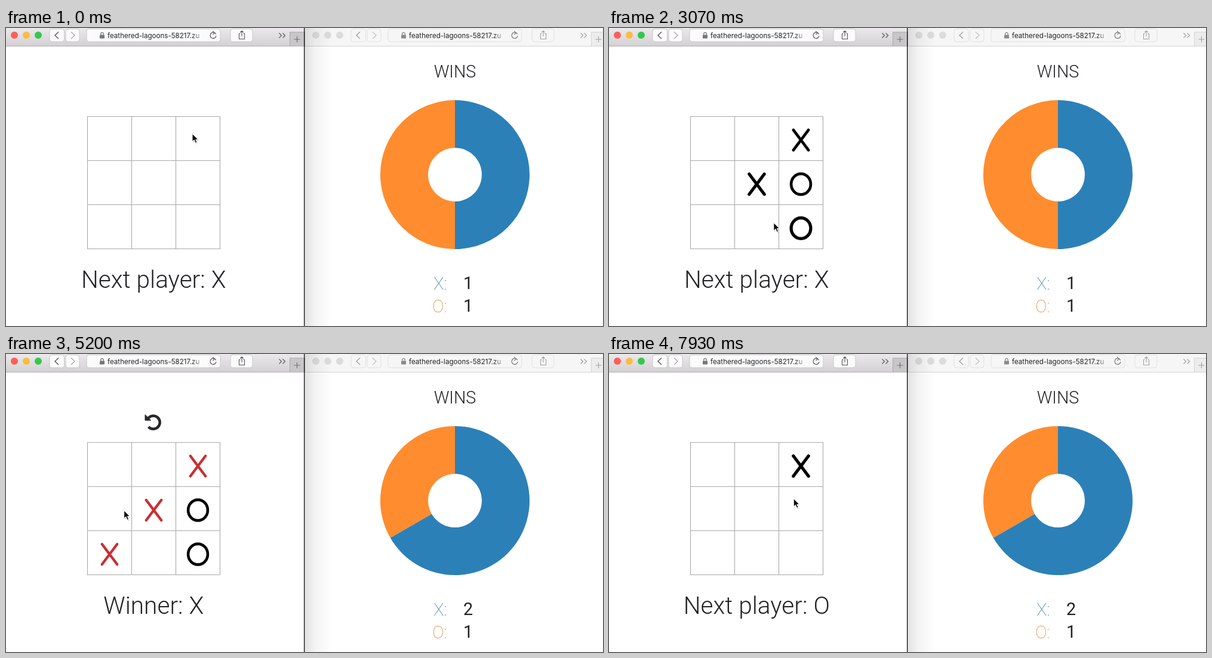
Write an HTML page that moves like this. It is 1000x500 px and loops after 8 s.

```html
<!DOCTYPE html>
<html lang="en">
<head>
<meta charset="utf-8">
<title>Noughts and crosses with a win chart</title>
<style>
  html, body { margin: 0; width: 100%; height: 100%; overflow: hidden; background: #fff; }
  svg { display: block; width: 100vw; height: 100vh; }
  text { font-family: Roboto, sans-serif; fill: #212325; }
  .url { font-family: Inter, sans-serif; font-size: 11.6px; }
  .status { font-size: 40.6px; font-weight: 300; text-anchor: middle; }
  .title { font-size: 28.7px; font-weight: 300; text-anchor: middle; }
  .key { font-size: 28.7px; font-weight: 100; text-anchor: end; }
  .count { font-size: 28.7px; font-weight: 400; }
</style>
</head>
<body>
<svg viewBox="0 0 1000 500">
  <defs>
    <linearGradient id="bar" x2="0" y2="1">
      <stop stop-color="#ebe9eb"/><stop offset="1" stop-color="#d3d1d3"/>
    </linearGradient>
    <linearGradient id="shade">
      <stop stop-color="#000" stop-opacity=".115"/>
      <stop offset=".4" stop-color="#000" stop-opacity=".045"/>
      <stop offset="1" stop-color="#000" stop-opacity="0"/>
    </linearGradient>
    <linearGradient id="fadeOn">
      <stop stop-color="#fbfbfb" stop-opacity="0"/><stop offset="1" stop-color="#fbfbfb"/>
    </linearGradient>
    <linearGradient id="fadeOff">
      <stop stop-color="#f6f6f6" stop-opacity="0"/><stop offset="1" stop-color="#f6f6f6"/>
    </linearGradient>
  </defs>
  <rect width="1000" height="500" fill="#fff"/>
  <g id="right"></g>
  <text class="title" x="752" y="83">WINS</text>
  <path id="orange" fill="#ff8c2e"/>
  <path id="blue" fill="#2c80b8"/>
  <text class="key" x="738.5" y="438.5" style="fill:#2a76a8">X:</text>
  <text class="key" x="738.5" y="476.5" style="fill:#dd8030">O:</text>
  <text class="count" id="xWins" x="766" y="438">1</text>
  <text class="count" x="766" y="476">1</text>
  <rect x="500" width="46" height="500" fill="url(#shade)"/>
  <g id="left"></g>
  <rect x="499" width="1.3" height="500" fill="#111"/>
  <path d="M136.5 148.5h222v222h-222zM210.5 148.5v222M284.5 148.5v222M136.5 222.5h222M136.5 296.5h222"
        fill="none" stroke="#a9a9ab" stroke-width="1.1"/>
  <g id="marks"></g>
  <g id="reset">
    <path d="M238.4 107.6A11 11 0 1 1 238.6 122.2" fill="none" stroke="#26282a" stroke-width="4.5"/>
    <path d="M233 101.8V111.3H242.6Z" fill="#26282a" stroke="#26282a" stroke-linejoin="round"/>
  </g>
  <text class="status" id="status" x="247.3" y="436.3"></text>
  <g id="cursor">
    <path d="M1 2V16L4 13 6.5 18 9 17 7 12H11Z" fill="#000" opacity=".15"/>
    <path d="M0 0V14L3.2 11 5.5 16.2 8 15.1 5.8 10.2H10Z" fill="#000" stroke="#fff" stroke-width="1.1"/>
  </g>
</svg>
<script>
const LOOP = 8000, RESET = 6300, WIN = 3650, COUNT = 3974;
const $ = id => document.getElementById(id);
const clamp = v => Math.max(0, Math.min(1, v));
const smooth = u => u * u * (3 - 2 * u);
const cubic = u => u < .5 ? 4 * u ** 3 : 1 - 4 * (1 - u) ** 3;

// Browser toolbar; the front window is coloured, the other one greyed.
function toolbar(x, on) {
  const ink = on ? '#58585a' : '#a2a2a4', weak = on ? '#aaa' : '#c4c4c4';
  const lights = on ? ['#fc5f5a', '#fdbc40', '#34c84a'] : ['#dcdcdc', '#dcdcdc', '#dcdcdc'];
  const face = on ? '#fbfbfb' : '#f6f6f6', rim = on ? '#c9c7c9' : '#e1e1e1';
  const button = (bx, w) =>
    `<rect x="${bx}" y="1.5" width="${w}" height="21.5" rx="4" fill="${face}" stroke="${rim}"/>`;
  const line = (d, c = ink, w = 1.4) =>
    `<path d="${d}" fill="none" stroke="${c}" stroke-width="${w}"/>`;
  const tab = on ? 475.5 : 475.5;
  return `<g transform="translate(${x})">
    <rect x="${on ? 0 : -5}" width="500" height="30" fill="${on ? 'url(#bar)' : '#f6f6f6'}"/>
    ${lights.map((c, i) => `<circle cx="${14 + i * 20}" cy="12" r="6" fill="${c}"/>`).join('')}
    ${button(73, 24.5)}${button(100, 23)}${button(135, 224)}${button(376, 37)}
    ${line('M88 6.5L82 12.2L88 18')}${line('M109 6.5L115 12.2L109 18', weak)}
    <rect x="157" y="11.5" width="8" height="6" rx=".8" fill="${on ? '#777' : '#8a8a8a'}"/>
    ${line('M158.7 12V10a2.3 2.3 0 0 1 4.6 0V12', on ? '#777' : '#8a8a8a', 1.2)}
    <text class="url" x="170" y="17">feathered-lagoons-58217.zu</text>
    <rect x="311" y="3" width="22" height="18" fill="url(#${on ? 'fadeOn' : 'fadeOff'})"/>
    <rect x="332.5" y="3" width="6" height="18" fill="${face}"/>
    ${line('M351.7 10.4A5 5 0 1 0 352 13.2', on ? ink : '#77777a', 1.2)}
    ${line('M346 5.2L349.5 8.2L346.3 11', on ? ink : '#77777a', 1.1)}
    ${line('M392.5 9.5H390.5V18.5H399.5V9.5H397.5M395 14V5M392.2 7.5L395 4.7L397.8 7.5', ink, 1.1)}
    ${line('M457.5 8.5L461.5 12.5L457.5 16.5M463.5 8.5L467.5 12.5L463.5 16.5', ink, 1.3)}
    <rect x="${tab}" y="7" width="25" height="23.5" fill="${on ? '#c8c6c8' : '#ececec'}" stroke="${on ? '#acaaac' : '#d4d4d4'}"/>
    ${line('M482.5 19H492.5M487.5 14V24', on ? '#6c6c6e' : '#a0a0a0', 1.1)}
    <rect x="${on ? 0 : -5}" y="30" width="500" height="1" fill="${on ? '#b3b1b3' : '#d4d4d4'}"/>
  </g>`;
}
$('left').innerHTML = toolbar(0, true);
$('right').innerHTML = toolbar(505, false);

// Moves: sign, column, row, start, end, part of the winning line
const moves = [
  ['X', 2, 0, 950, RESET, true],
  ['O', 2, 1, 1660, RESET],
  ['X', 1, 1, 2250, RESET, true],
  ['O', 2, 2, 2850, RESET],
  ['X', 0, 2, WIN, RESET, true],
  ['X', 2, 0, 7450, LOOP]
];
const shapes = {
  X: '<path d="M-12.7 -17L12.7 17M12.7 -17L-12.7 17"/>',
  O: '<ellipse rx="16.4" ry="17.4"/>'
};
$('marks').innerHTML = moves.map(([sign, col, row]) =>
  `<g transform="translate(${173.5 + col * 74} ${188 + row * 74})" fill="none" stroke-linecap="round">${shapes[sign]}</g>`).join('');

// Pointer stops: time, x, y
const stops = [
  [0, 312, 177], [1090, 312, 177], [1500, 312, 254], [1780, 312, 254],
  [2120, 247, 255], [2370, 247, 255], [2700, 320, 327], [2880, 320, 327],
  [3400, 175.5, 325], [4950, 175.5, 325], [5650, 251, 111], [6450, 251, 111],
  [7050, 312, 177], [7600, 312, 177], [8000, 309, 248]
];
function pointer(t) {
  const i = Math.max(1, stops.findIndex(s => s[0] > t));
  const [t0, x0, y0] = stops[i - 1], [t1, x1, y1] = stops[i];
  const u = smooth((t - t0) / (t1 - t0));
  return [x0 + (x1 - x0) * u, y0 + (y1 - y0) * u];
}

// Ring sector between two shares of the full turn, clockwise from the top
function sector(from, to) {
  const at = (share, r) => {
    const a = share * 2 * Math.PI;
    return `${752 + r * Math.sin(a)} ${246 - r * Math.cos(a)}`;
  };
  const big = to - from > .5 ? 1 : 0;
  return `M${at(from, 125)}A125 125 0 ${big} 1 ${at(to, 125)}L${at(to, 45)}A45 45 0 ${big} 0 ${at(from, 45)}Z`;
}

function render(t) {
  const red = clamp((t - WIN) / 300);
  const tint = `rgb(${202 * red},${46 * red},${50 * red})`;
  moves.forEach(([, , , start, end, wins], i) => {
    const el = $('marks').children[i], age = t - start;
    const won = wins && start <= WIN;
    el.style.display = age >= 0 && t < end ? '' : 'none';
    el.setAttribute('opacity', clamp(.25 + age / 300));
    el.setAttribute('stroke', won ? tint : '#000');
    el.setAttribute('stroke-width', 5.3 - .7 * clamp((age - 600) / 900) - (won ? .2 * red : 0));
  });

  const shown = moves.filter(m => t >= m[3] && t < m[4]).length;
  const over = t >= WIN && t < RESET;
  $('status').textContent = over ? 'Winner: X' : 'Next player: ' + (shown % 2 ? 'O' : 'X');
  $('reset').style.display = over ? '' : 'none';

  const share = .5 + cubic(clamp((t - COUNT) / 750)) / 6;
  $('blue').setAttribute('d', sector(0, share));
  $('orange').setAttribute('d', sector(share, 1));
  $('xWins').textContent = t < COUNT ? 1 : 2;
  $('cursor').setAttribute('transform', `translate(${pointer(t)})`);
}

const begin = performance.now();
function tick(now) {
  render(Math.max(0, now - begin) % LOOP);
  requestAnimationFrame(tick);
}
render(0);
requestAnimationFrame(tick);
</script>
</body>
</html>
```
